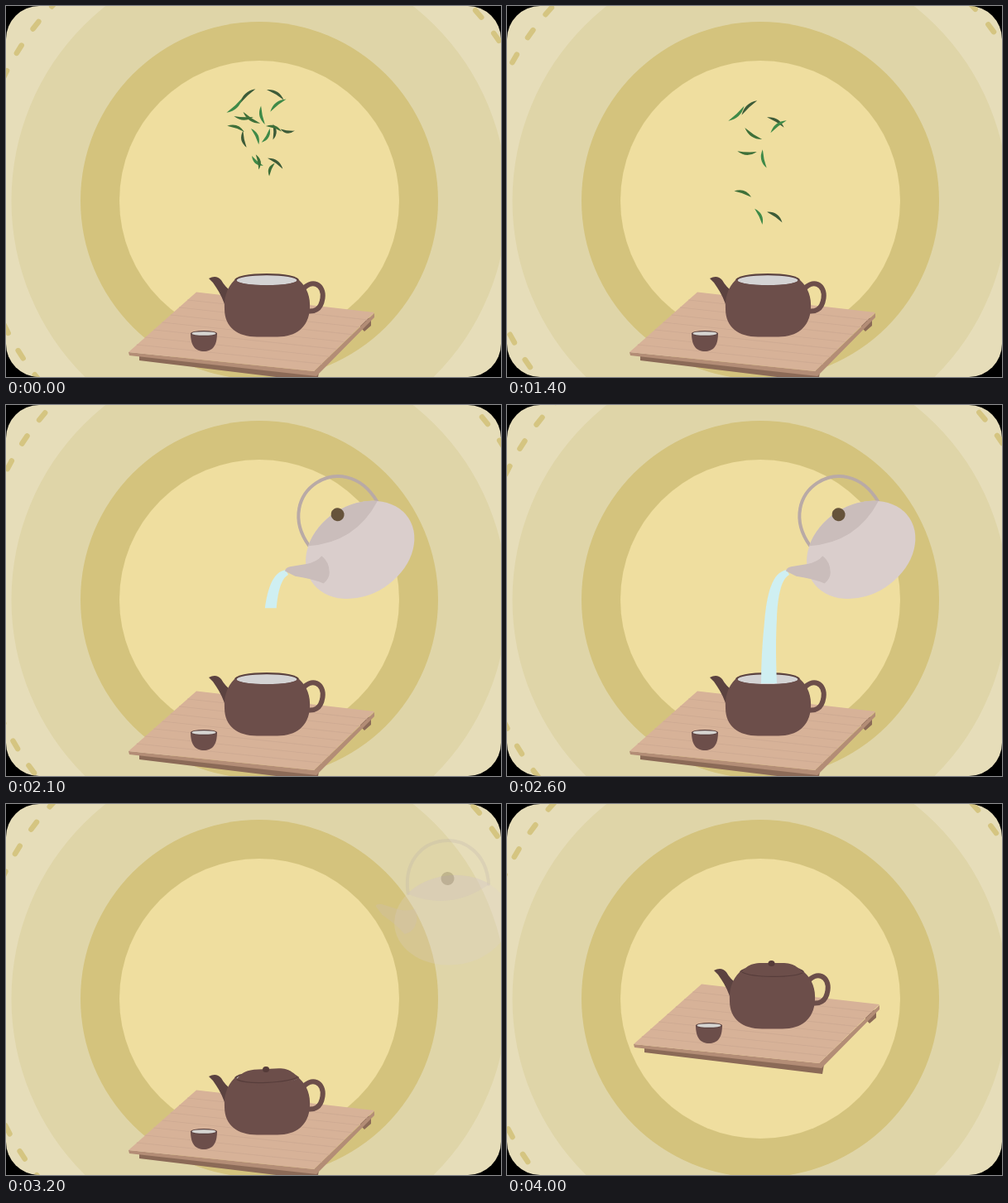
Animation, 598 px wide and 448 px high, one loop 4.3 s. Source, as an HTML page with a canvas:

```html
<!DOCTYPE html>
<html lang="en">
<head>
<meta charset="utf-8">
<title>Making tea</title>
<style>
  html, body { margin: 0; width: 100%; height: 100%; overflow: hidden; background: #000; }
  canvas { display: block; }
</style>
</head>
<body>
<canvas id="stage" width="598" height="448"></canvas>
<script>
const ctx = document.getElementById('stage').getContext('2d');
const LOOP = 4300, STEP = 100;
const CX = 306, CY = 235;
const CLAY = '#6c4e4a', DARK_CLAY = '#5b4240';

const clamp = v => Math.max(0, Math.min(1, v));
const span = (t, from, to) => clamp((t - from) / (to - from));
const mix = (a, b, k) => a + (b - a) * k;
const rad = deg => deg * Math.PI / 180;

function fill(path, color) {
  ctx.fillStyle = color;
  ctx.fill(new Path2D(path));
}
function line(path, color, width) {
  ctx.strokeStyle = color;
  ctx.lineWidth = width;
  ctx.stroke(new Path2D(path));
}
function oval(x, y, rx, ry, color) {
  ctx.beginPath();
  ctx.ellipse(x, y, rx, ry, 0, 0, 7);
  ctx.fillStyle = color;
  ctx.fill();
}
function layer(draw) {
  ctx.save();
  draw();
  ctx.restore();
}

function backdrop(t) {
  ctx.fillStyle = '#e6ddb9';
  ctx.fillRect(0, 0, 598, 448);
  const turn = 0.24 * Math.max(0, Math.min(30, t / STEP - 5));
  const dash = deg => layer(() => {
    ctx.translate(309, CY);
    ctx.rotate(rad(deg - turn));
    line('M345.5-5.5V5.5', '#d5c581', 6.5);
  });
  for (let i = -14; i < 4; i++) dash(217.8 + i * 5.86);
  for (let i = -2; i < 4; i++) dash(-34.9 + i * 5.86);
  oval(CX, CY, 299.5, 299.5, '#dfd5a8');
  oval(CX, CY, 216, 216, '#d4c37d');
  oval(CX, CY, 169, 169, '#efde9f');
}

function table() {
  fill('M428 380L441 376V386L433 393L428 388Z', '#8b6a57');
  fill('M161 421L372 443L379 437L376 454L161 428Z', '#8b6a57');
  fill('M148 418L372 441L445 371V376L375 447L149 422Z', '#b38d76');
  fill('M230 345.5L445 370L372 441L148 418Z', '#d7b298');
  for (let i = 1; i < 8; i++) {
    const k = i / 8;
    line(`M${mix(230, 148, k)} ${mix(346, 418, k)}L${mix(445, 372, k)} ${mix(370, 441, k)}`, '#cfab93', 1.2);
  }
}

function cup() {
  fill('M223 395C223 411 229 417 239 417C249 417 255 411 255 395Z', CLAY);
  oval(239, 395.5, 16, 3.5, DARK_CLAY);
  oval(239, 395.5, 14.5, 2.3, '#d6d5d2');
}

// Centre and direction of each leaf, in the order they fall
const leaves = [
  [320, 197, 113], [340, 151, 7], [303, 188, 40], [305, 188, 259], [324, 152, 270], [315, 157, 300],
  [324, 147, 199], [287, 161, 78], [302, 157, 244], [278, 147, 199], [326, 189, 215], [309, 132, 78],
  [287, 135, 2], [326, 106, 211], [328, 119, 142], [296, 136, 34], [291, 108, 137], [277, 121, 317]
];
const greens = ['#3f8a48', '#3f7039', '#3d5b38'];

function drawLeaf([x, y, deg], i, t) {
  const start = Math.min(640 + 65 * i, 1050 + 14 * i);
  const dy = 7000 * (Math.max(0, t - start) / 1000) ** 3;
  if (y + dy > 350) return;
  const half = 8.5 + i * 0.27;
  layer(() => {
    ctx.translate(x + (315 - x) * dy * 0.0025, y + dy);
    ctx.rotate(rad(deg));
    fill(`M${-half}-1.5Q0 7 ${half}-1.5Q0 0 ${-half}-1.5Z`, greens[(i + 1) % 3]);
  });
}

function stream(t) {
  const top = mix(198, 340, span(t, 2700, 2900));
  const end = mix(198, 340, span(t, 2000, 2300));
  if (end <= top) return;
  layer(() => {
    ctx.beginPath();
    ctx.rect(290, top, 60, end - top);
    ctx.clip();
    fill('M338 199C320 202 314 228 311 262Q307 300 307 336H326Q324 290 326 258C327 232 331 210 341 205Z', '#cfeff2');
  });
}

function lid(t) {
  const drop = span(t, 2900, 3200);
  if (!drop) return;
  layer(() => {
    ctx.globalAlpha = drop;
    ctx.translate(315, 329 - 50 * (1 - drop));
    ctx.rotate(rad(-3 * (1 - span(t, 3200, 3600))));
    ctx.translate(-315, -329);
    fill('M276 332C283 328 284 321 300 320H330C344 321 346 326 354 332C344 342 286 342 276 332Z', CLAY);
    line('M279 331C292 338 338 338 352 332', '#573d3b', 1.2);
    oval(314.5, 320.5, 4, 3.5, '#553b39');
  });
}

function pot(t) {
  fill('M245 329Q254 324 260 331Q265 340 273 345L266 366Q261 350 254 340Q250 333 245 329Z', DARK_CLAY);
  line('M357 344C369 328 385 336 382.5 353C380.5 367 372 370 362 368', CLAY, 6);
  oval(315, 331, 39, 8, DARK_CLAY);
  oval(315, 331.3, 36.5, 6, '#d4d3d4');
  leaves.forEach((leaf, i) => drawLeaf(leaf, i, t));
  stream(t);
  fill('M276 331L278.5 331.3A36.5 6 0 0 0 351.5 331.3L354 331C364 340 368 352 367 365C366 388 350 399.5 328 399.5H303C280 399.5 264 388 264 366C263 352 267 340 276 331Z', CLAY);
  lid(t);
}

function kettle(t) {
  const enter = span(t, 1650, 1950), leave = span(t, 2900, 3300);
  if (!enter || leave === 1) return;
  layer(() => {
    ctx.globalAlpha = enter * (1 - leave);
    ctx.translate(mix(413, 407, enter) + 170 * leave, mix(68, 143, enter) - 54 * leave);
    ctx.rotate(rad(mix(4, -33, enter) + 35 * leave));
    line('M-49 0C-52-78 52-78 49 0', '#b9aaa6', 4);
    oval(0, 38, 70, 54, '#dacecc');
    fill('M-50 0A70 54 0 0 1 50 0Q0 28-50 0Z', '#cabdbb');
    fill('M-90 10Q-87 7-82 9L-64 17Q-52 22-43 19Q-39 30-46 41Q-50 47-59 48Q-67 36-83 22Z', '#cabdbb');
    oval(0.5, -12.5, 8, 8, '#66533b');
  });
}

function draw(t) {
  ctx.clearRect(0, 0, 598, 448);
  layer(() => {
    ctx.lineCap = 'round';
    ctx.beginPath();
    ctx.roundRect(0, 0, 598, 448, 40);
    ctx.clip();
    backdrop(t);
    layer(() => {
      const k = span(t, 3700, 4000), rise = k * k * (3 - 2 * k);
      ctx.translate(5 * rise, -128 * rise);
      table();
      pot(t);
      cup();
    });
    kettle(t);
  });
}

function tick() {
  const t = performance.now() % LOOP;
  draw(Math.floor(t / STEP) * STEP);
  requestAnimationFrame(tick);
}
tick();
</script>
</body>
</html>
```
